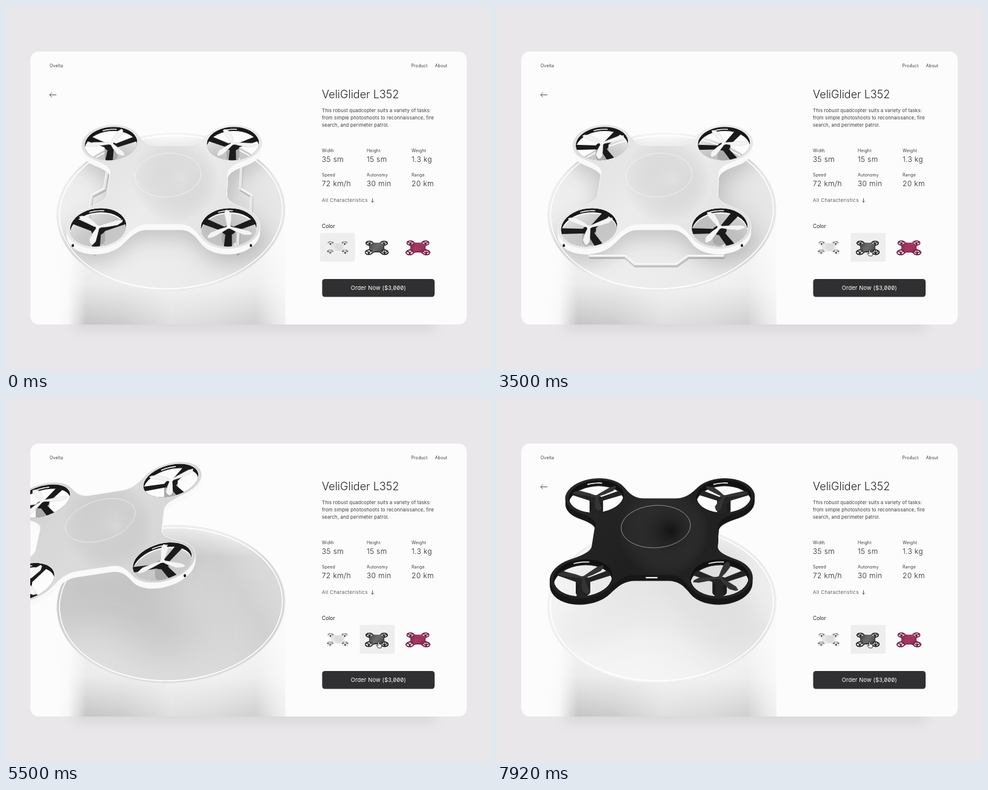
Recreate the animation shown at these times as an HTML page with a canvas. Size 800 by 600 pixels, loop 8 s.

```html
<!DOCTYPE html>
<html lang="en">
<head>
<meta charset="utf-8">
<title>Product page</title>
<style>
  html, body { margin: 0; width: 100%; height: 100%; overflow: hidden; background: #e9e7ea; }
  svg, canvas { position: absolute; left: 0; top: 0; width: 800px; height: 600px; }
  text { font-family: Inter, sans-serif; fill: #3c3c3e; }
  .small { font-size: 7px; letter-spacing: .15px; }
  .title { font-size: 18px; font-weight: 300; fill: #222; }
  .copy { font-size: 7.9px; letter-spacing: .1px; fill: #6c6c6e; }
  .value { font-size: 12px; font-weight: 300; letter-spacing: .35px; fill: #222; }
  .more { font-size: 8px; letter-spacing: .38px; fill: #5a5a5c; }
  .color { font-size: 8.5px; fill: #222; }
  .order { font-size: 9.4px; letter-spacing: .1px; fill: #fff; text-anchor: middle; font-feature-settings: "zero"; }
</style>
</head>
<body>
<svg viewBox="0 0 800 600">
  <rect x="112" y="500" width="596" height="36" rx="10" fill="#b9b7bb" opacity=".32" style="filter:blur(10px)"/>
  <rect x="40" y="75" width="720" height="450" rx="14" fill="#fdfcfd"/>
  <g class="small">
    <text x="72" y="101">Ovelta</text>
    <text x="668.5" y="101">Product</text>
    <text x="707.5" y="101">About</text>
  </g>
  <path d="M83 146.500H72M76 142.500L72 146.500L76 150.500" fill="none" stroke="#444" stroke-width=".9"/>
  <text class="title" x="521" y="151.500">VeliGlider L352</text>
  <g class="copy">
    <text x="521" y="175">This robust quadcopter suits a variety of tasks:</text>
    <text x="521" y="187">from simple photoshoots to reconnaissance, fire</text>
    <text x="521" y="199">search, and perimeter patrol.</text>
  </g>
  <g id="specs"></g>
  <text class="more" x="521" y="323">All Characteristics</text>
  <path d="M604.500 317V323.500M602.300 321.300L604.500 323.500L606.700 321.300" fill="none" stroke="#444" stroke-width=".9"/>
  <text class="color" x="521" y="366">Color</text>
  <rect x="521.500" y="450" width="185.500" height="29.500" rx="4.500" fill="#302f31"/>
  <text class="order" x="614.300" y="468">Order Now ($3,000)</text>
</svg>
<canvas width="800" height="600"></canvas>
<script>
const LOOP = 8000, TAU = Math.PI * 2, DEG = TAU / 360;
const ARM = 104, RING = 50, HOLE = 44.5, THICK = -12;
const canvas = document.querySelector('canvas');
const ctx = canvas.getContext('2d');
const density = window.devicePixelRatio || 1;
canvas.width = 800 * density;
canvas.height = 600 * density;

const specs = [['Width', '35 sm'], ['Height', '15 sm'], ['Weight', '1.3 kg'],
  ['Speed', '72 km/h'], ['Autonomy', '30 min'], ['Range', '20 km']];
document.getElementById('specs').innerHTML = specs.map(([label, value], i) => {
  const x = 521 + i % 3 * 74, y = 241 + (i > 2) * 40;
  return `<text class="small" x="${x}" y="${y}">${label}</text><text class="value" x="${x}" y="${y + 15.5}">${value}</text>`;
}).join('');

const WHITE = { top: ['#dedede', '#ececec', '#e0e0e0'], side: '#f9f9f9', wall: '#19191a', spoke: '#1b1b1c',
  motor: '#aaa', blade: '#f4f4f4', bladeEdge: '#cfcfcf', line: 'rgba(255,255,255,.6)', dome: 'rgba(212,212,212,.45)', shadow: .2 };
const BLACK = { top: ['#292929', '#1f1f20', '#242424'], side: '#171717', wall: '#111', spoke: '#242425',
  motor: '#1c1c1d', blade: '#343435', bladeEdge: '#222', line: '#9a9a9a', dome: 'rgba(8,8,8,.55)', shadow: .08 };
const GRAPHITE = { ...BLACK, top: ['#333', '#6c6c6c', '#2c2c2c'], line: '#666', dome: 'rgba(100,100,100,.4)' };
const RED = { ...BLACK, top: ['#842049', '#a83562', '#842049'], side: '#701840', wall: '#3c0e26', spoke: '#4a1230',
  motor: '#4a1230', blade: '#96305a', bladeEdge: '#701840', line: '#b8527a', dome: 'rgba(140,36,84,.4)' };

const clamp = v => Math.min(1, Math.max(0, v));
const smooth = (from, to, t) => { const u = clamp((t - from) / (to - from)); return u * u * (3 - 2 * u); };

// Drone space (x right, y towards the viewer, z up) to stage pixels
function projector({ x: cx, y: cy, size = 1, tilt = .663, yaw = 0, roll = 0, vanish = cx }) {
  const c = Math.cos(yaw), s = Math.sin(yaw);
  return (x, y, z = 0) => {
    const X = x * c - y * s, Y = x * s + y * c, depth = 1 / (1 - Y * .00033);
    return [cx + X * size * depth + (cx - vanish) * (depth - 1),
      cy + (Y * tilt * depth - z * .75 - roll * X) * size];
  };
}

function addPoly(path, points, close = true) {
  points.forEach(([x, y], i) => i ? path.lineTo(x, y) : path.moveTo(x, y));
  if (close) path.closePath();
  return path;
}
const poly = (points, close) => addPoly(new Path2D(), points, close);

function arc(cx, cy, r, from = 0, to = TAU, steps = 36) {
  return Array.from({ length: steps + 1 }, (_, i) => {
    const a = from + (to - from) * i / steps;
    return [cx + r * Math.cos(a), cy + r * Math.sin(a)];
  });
}

const rotors = [45, 135, 225, 315].map(d => {
  const a = d * DEG;
  return { a, x: Math.SQRT2 * ARM * Math.cos(a), y: Math.SQRT2 * ARM * Math.sin(a) };
});

// From a rotor rim down to the flat middle of a side
const fillet = Array.from({ length: 10 }, (_, i) => {
  const u = (i + 1) / 10, v = 1 - u;
  const cubic = (a, b, c, d) => a * v ** 3 + 3 * b * v * v * u + 3 * c * v * u * u + d * u ** 3;
  return [cubic(60.7, 51, 42, 26), cubic(129, 112, 98, 98)];
});
const side = [...fillet, ...fillet.map(([x, y]) => [-x, y]).reverse()];

// Arcs around the four rotors, joined by the concave sides
const outline = rotors.flatMap(({ a, x, y }, i) => {
  const rim = arc(x, y, RING, a - 105 * DEG, a + 105 * DEG, 24);
  const c = Math.cos(i * 90 * DEG), s = Math.sin(i * 90 * DEG);
  return [...rim, ...side.map(([sx, sy]) => [sx * c - sy * s, sx * s + sy * c])];
});

function fill(path, style, rule) { ctx.fillStyle = style; ctx.fill(path, rule || 'nonzero'); }
function stroke(path, style, width) { ctx.strokeStyle = style; ctx.lineWidth = width; ctx.stroke(path); }

function drawRotor(o, P, pal, rotor, spin) {
  const { x, y } = rotor, k = o.size;
  const at = (points, z) => points.map(p => P(p[0], p[1], z));
  const polar = (a, r, side) => [x + r * Math.cos(a) - side * Math.sin(a), y + r * Math.sin(a) + side * Math.cos(a)];
  const top = at(arc(x, y, HOLE), 0);
  ctx.save();
  ctx.clip(poly(top));

  const motor = poly(at(arc(x, y, 11), -30));
  addPoly(motor, [P(...polar(-o.yaw, 11, 0), -30), P(...polar(Math.PI - o.yaw, 11, 0), -30),
    P(...polar(Math.PI - o.yaw, 11, 0), -8), P(...polar(-o.yaw, 11, 0), -8)]);
  fill(motor, pal.motor);

  for (const d of [90, 210, 330]) {
    const a = d * DEG;
    fill(poly(at([polar(a, 4, 5), polar(a, 48, 7), polar(a, 48, -7), polar(a, 4, -5)], -9)), pal.spoke);
  }
  fill(poly(at(arc(x, y, 11), -7)), pal.spoke);

  fill(addPoly(poly(top), at(arc(x, y, HOLE), THICK + 3)), pal.wall, 'evenodd');
  const back = 245 * DEG - o.yaw;
  stroke(poly(at(arc(x, y, HOLE - .5, back, back + 32 * DEG, 8), -5), false), '#eee', 1.6 * k);

  for (let i = 0; i < 3; i++) {
    const a = spin + i * TAU / 3;
    const blade = poly(at([polar(a, 2, 2), polar(a, 14, 5), polar(a, 30, 7), polar(a, 39, 3),
      polar(a, 41, -1), polar(a, 33, -4), polar(a, 14, -3), polar(a, 2, -2)], 0));
    fill(blade, pal.blade);
    stroke(blade, pal.bladeEdge, .5 * k);
  }
  fill(poly(at(arc(x, y, 4), 0)), pal.blade);
  ctx.restore();
}

function drawSkids(P, lift) {
  const drop = 54 * (1 - lift / 64);
  if (drop <= 0) return;
  const shape = [[-108, 104, drop * .8], [-106, 114, 0], [-50, 114, 0], [-33, 133, 0],
    [33, 133, 0], [50, 114, 0], [106, 114, 0], [108, 104, drop * .8]];
  ctx.lineJoin = 'round';
  for (const sign of [1, -1]) {
    const points = shape.map(([along, out, up]) => P(sign * out, along, up - drop)).map(([x, y]) => [x + 4, y]);
    stroke(poly(points.map(([x, y]) => [x + 1, y + 3]), false), 'rgba(120,120,120,.4)', 4);
    stroke(poly(points, false), '#f6f6f6', 4);
    stroke(poly(points.map(([x, y]) => [x, y + 1.5]), false), '#d2d2d2', 1);
  }
}

function drawDrone(options, pal, t, lift = 0) {
  const o = { size: 1, yaw: 0, ...options }, P = projector(o), k = o.size;
  const shell = z => {
    const path = poly(outline.map(([x, y]) => P(x, y, z)));
    for (const { x, y } of rotors) addPoly(path, arc(x, y, HOLE).map(p => P(p[0], p[1], z)));
    return path;
  };
  if (pal === WHITE && k > .5) drawSkids(P, lift);
  for (let z = THICK; z < 0; z += 2) fill(shell(z), pal.side, 'evenodd');

  const top = shell(0);
  const shade = gradient(o.x - 120 * k, o.y - 110 * k, o.x + 120 * k, o.y + 110 * k,
    pal.top.map((color, i) => [i / 2, color]));
  fill(top, shade, 'evenodd');
  if (pal === WHITE) fill(top, `rgba(80,80,80,${.0014 * lift})`, 'evenodd');
  stroke(top, pal.side, .8 * k);

  const [dx, dy] = P(0, 0, 20);
  const dome = ctx.createRadialGradient(dx + 25 * k, dy + 8 * k, 0, dx + 12 * k, dy + 8 * k, 72 * k);
  dome.addColorStop(0, pal.dome);
  dome.addColorStop(1, 'rgba(128,128,128,0)');
  fill(top, dome, 'evenodd');
  stroke(poly(arc(0, 0, 54.5).map(p => P(p[0], p[1], 20))), pal.line, .9 * k);

  rotors.forEach((rotor, i) => {
    drawRotor(o, P, pal, rotor, (i % 2 ? 1 : -1) * t * .0055 + i * 1.3 + .4);
    if (Math.sin(rotor.a + o.yaw) > .5) {
      const [x, y] = P(rotor.x + 51 * Math.cos(rotor.a), rotor.y + 51 * Math.sin(rotor.a), -6);
      const dot = new Path2D();
      dot.ellipse(x, y, 2 * k, 2.5 * k, 0, 0, TAU);
      fill(dot, '#161616');
    }
  });
  if (pal === BLACK) stroke(poly([P(-9, 98, -5), P(9, 98, -5)], false), '#eee', 2.2 * k);
}

function gradient(x0, y0, x1, y1, stops) {
  const g = ctx.createLinearGradient(x0, y0, x1, y1);
  stops.forEach(([at, color]) => g.addColorStop(at, color));
  return g;
}

function ellipse(rx, ry) {
  const path = new Path2D();
  path.ellipse(272, 340, rx, ry, -.05, 0, TAU);
  return path;
}

function drawPodium(drone, pal, lift, t) {
  ctx.fillStyle = gradient(84, 0, 461, 0, [[0, '#fdfcfd'], [.05, '#f6f6f6'], [.13, '#c2c2c2'], [.3, '#cacaca'],
    [.5, '#dedede'], [.7, '#d8d8d8'], [.87, '#cdcdcd'], [.96, '#e8e8e8'], [1, '#efefef']]);
  ctx.fillRect(84, 340, 377, 185);
  ctx.fillStyle = gradient(0, 400, 0, 530, [[0, 'rgba(253,252,253,.85)'], [.45, 'rgba(253,252,253,.7)'], [1, 'rgba(253,252,253,0)']]);
  ctx.fillRect(83, 340, 379, 185);

  const disc = ellipse(188.5, 130);
  fill(disc, gradient(130, 420, 400, 250, [[0, '#f7f7f7'], [.5, '#f2f2f2'], [.85, '#e6e6e6'], [1, '#eee']]));
  const ambient = .03 + .06 * smooth(3500, 4700, t) - .09 * smooth(5500, 6500, t);
  fill(disc, `rgba(0,0,0,${ambient})`);
  ctx.save();
  ctx.clip(disc);
  ctx.fillStyle = gradient(0, 208, 0, 262, [[0, 'rgba(253,252,253,.95)'], [1, 'rgba(253,252,253,0)']]);
  ctx.fillRect(80, 200, 385, 70);
  const P = projector({ ...drone, y: 313, roll: 0 });
  ctx.filter = `blur(${(16 + lift * .25) * density}px)`;
  fill(poly(outline.map(([x, y]) => P(x * 1.04, y * 1.04))), `rgba(40,40,40,${pal.shadow * (1 - lift * .004)})`);
  ctx.restore();
  stroke(disc, '#ebebeb', 1);
  stroke(ellipse(184, 126), '#fff', 1.6);
}

function drawThumbs(selection) {
  const box = (x, alpha) => {
    const path = new Path2D();
    path.roundRect(x, 374, 57.5, 47.5, 2.5);
    fill(path, `rgba(239,238,239,${alpha})`);
  };
  box(518, 1 - selection);
  box(583.5, selection);
  [[547, WHITE, .115], [611.5, GRAPHITE, .121], [679.5, RED, .125]].forEach(([x, pal, size]) =>
    drawDrone({ x, y: 397.5, size, tilt: .6 }, pal, 0));
}

function drawCursor(x, y) {
  ctx.save();
  ctx.translate(x, y);
  ctx.lineJoin = 'round';
  const shape = x < 641
    ? new Path2D('M-2 -5Q-.8 -6 0 -5L.6 -1.500L4 -.8Q5 -.3 4.700 1.500L3.800 5H-1L-4 1.300Q-4 0 -2.700 .5L-1.300 1.500Z')
    : new Path2D('M-3 -5L-3 5L-.6 2.800L1 6L2.500 5.300L1 2.200H4Z');
  fill(shape, '#fff');
  stroke(shape, '#222', .9);
  ctx.restore();
}

function departing(t) {
  const lift = 76 * smooth(3500, 4700, t);
  const away = Math.max(0, t - 4860) / 640;
  return { lift, x: 267 - 111 * away * away, roll: .155 * smooth(4800, 5500, t), yaw: 90 * DEG * smooth(1620, 3500, t) };
}

function arriving(t) {
  const left = Math.max(0, 7900 - t) / 1070;
  const lift = 66 + 8 * Math.sin(Math.PI * clamp((t - 6830) / 1090));
  return { lift, x: 262 + 460 * left * left, roll: .165 * (1 - smooth(7150, 7850, t)), yaw: 0 };
}

function frame() {
  const t = performance.now() % LOOP;
  const leaving = t < 6400;
  const pal = leaving ? WHITE : BLACK;
  const { lift, ...pose } = leaving ? departing(t) : arriving(t);
  const drone = { ...pose, y: 293 - lift, size: 1 + .0007 * lift, tilt: .663 * (1 - .0011 * lift), vanish: 472 };

  ctx.setTransform(density, 0, 0, density, 0, 0);
  ctx.clearRect(0, 0, 800, 600);
  ctx.save();
  const card = new Path2D();
  card.roundRect(40, 75, 720, 450, 14);
  ctx.clip(card);
  drawThumbs(smooth(1650, 1850, t));
  drawPodium(drone, pal, lift, t);
  drawDrone(drone, pal, t, lift);
  ctx.restore();

  const glide = smooth(80, 1600, t);
  drawCursor(815 - 200 * glide, 615 - 208 * glide);
  requestAnimationFrame(frame);
}
frame();
</script>
</body>
</html>
```
